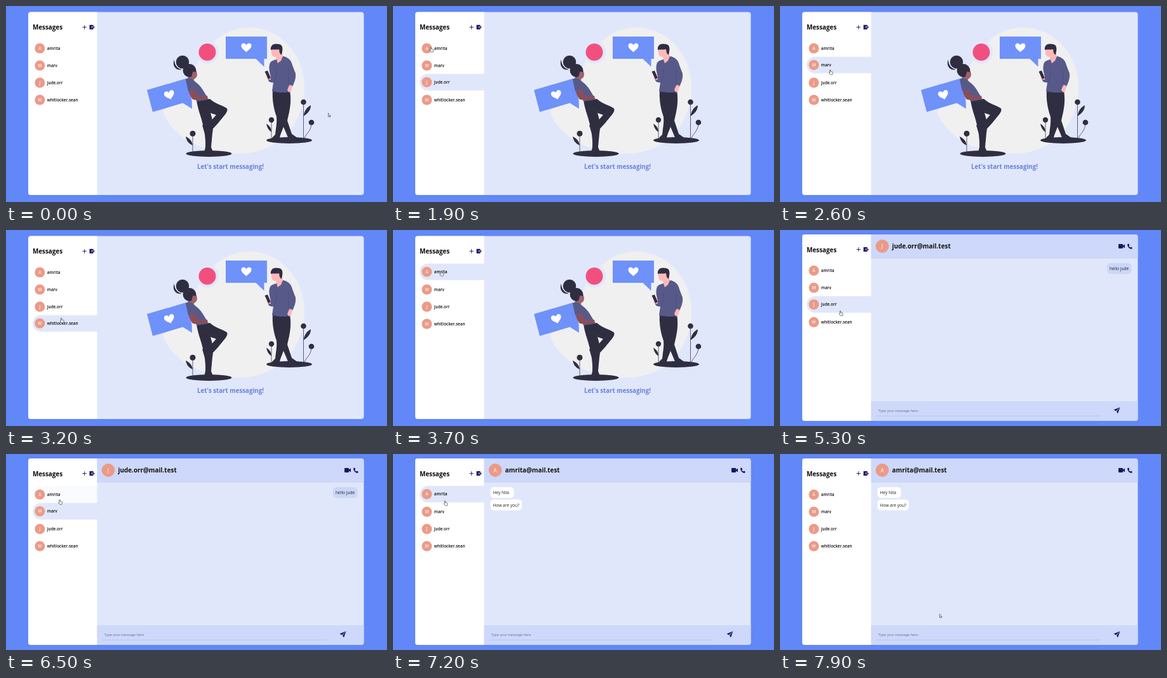
An HTML page for the animation above (8 s loop, 600 by 308 pixels).

```html
<!DOCTYPE html>
<html lang="en">
<head>
<meta charset="utf-8">
<title>Messages</title>
<style>
  html, body { margin: 0; width: 100%; height: 100%; overflow: hidden; background: #6187f9; }
  svg { display: block; width: 100%; height: 100%; font-family: "Open Sans", "Noto Sans", sans-serif; }
  .bold { font-weight: 700; }
  .dark { fill: #2f2e41; }
  .shirt { fill: #575a89; }
  .skin { fill: #ffb9b9; }
  .bubble { fill: #6f91fa; }
  .navy { fill: #1b1464; }
  .line { fill: none; stroke: #3f3d56; stroke-width: .8; }
  .crease { fill: none; stroke: #3f3d56; stroke-width: .7; opacity: .5; }
  .name { font-size: 6.4px; font-weight: 600; fill: #0b0b0b; }
  .initial { fill: #fff4f0; text-anchor: middle; }
  .msg { font-size: 6.6px; fill: #222; }
</style>
</head>
<body>
<svg viewBox="0 0 600 308">
  <defs>
    <path id="heart" fill="#fff" d="M0 7C-3 4-8 1-8-3C-8-7.500-2.500-8.500 0-4C2.500-8.500 8-7.500 8-3C8 1 3 4 0 7Z"/>
    <clipPath id="card"><rect id="cardBox" x="35" width="528.500" rx="4"/></clipPath>
  </defs>
  <rect width="600" height="308" fill="#6187f9"/>
  <g clip-path="url(#card)">
    <rect width="600" height="308" fill="#e1e7fb"/>
    <rect width="143.500" height="308" fill="#fff"/>

    <g id="home">
      <path fill="#f0f0f1" d="M383 34C430 34 470 75 470 127C470 190 425 232 368 232C306 232 259 203 247 165C262 152 278 128 302 90C320 58 345 34 383 34Z"/>
      <circle cx="317" cy="72.500" r="18" fill="#e1e7fb"/>
      <circle cx="317" cy="72.500" r="13.500" fill="#f1507e"/>
      <path class="bubble" d="M346 48H411V83H406.500V95.500L393.500 83H346Z"/>
      <use href="#heart" x="378.500" y="65.500"/>
      <path class="bubble" d="M222 132L283.500 114L292.500 148L293 161.500L278.500 152.500L231 166.500Z"/>
      <use href="#heart" transform="translate(257.500 140) rotate(-15)"/>

      <g class="dark">
        <ellipse cx="319.500" cy="232" rx="36" ry="5"/>
        <ellipse cx="446" cy="211" rx="36" ry="5"/>
        <circle cx="294" cy="200.500" r="4.500"/>
        <circle cx="418" cy="179" r="4.200"/>
        <circle cx="468.500" cy="151" r="4.300"/>
        <circle cx="481" cy="183" r="4.300"/>
        <path d="M294 219C287 216 284 211 283 205C289 208 293 212 294 219Z"/>
        <path d="M418 198C413 195 411 190 410 185C415 188 418 192 418 198Z"/>
        <path d="M468.500 173C470 164 474 159 480 156C480 164 475 169 468.500 173Z"/>
      </g>
      <path class="line" d="M294 200V231M418 179V208M468.500 151V208M481 183C481 196 474 199 470 207"/>

      <!-- woman -->
      <path class="dark" d="M265 84C261 93 267 102 277 100C269 98 265 92 265 84Z"/>
      <circle class="dark" cx="278" cy="88" r="10.300"/>
      <path fill="#a0616a" d="M289 103L299 101C302 105 301 112 297 114L293 121L286 115Z"/>
      <circle class="dark" cx="289" cy="101.500" r="10.400"/>
      <path fill="#a0616a" d="M294.500 103L300 104C302 109 300 114 296 114.500L291.500 113Z"/>
      <path class="dark" d="M300 148L321 146C330 154 343 157 348 161C351 166 341 175 335 183L324 195L318 194L313 201L309 187L318 189C320 183 327 176 331 171L322 168C326 180 327 190 325 200L323 222L328 234C322 237 312 237 311 234L314 222C315 206 311 188 306 172C303 163 301 155 300 148Z"/>
      <path class="shirt" d="M283 115C288 111 294 114 298 119C307 125 312 135 319 147L300 150C296 137 286 127 283 115Z"/>
      <path fill="#8b4d58" d="M287 126C287 133 289 140 293 146C297 149 308 147 318 146L317 141C309 142 302 140 298 137L296 126Z"/>
      <path class="shirt" d="M283 116C289 111 299 118 298 130L287 134Z"/>
      <path class="crease" d="M322 168L331 171M309 159C316 164 323 165 331 167"/>

      <!-- man -->
      <path class="dark" d="M420 132L447 133C450 150 447 163 443 180L450 201L460 208C460 214 450 214 446 211L437 190L432 203L430 211C426 214 417 212 419 207L424 202C425 192 427 183 426 174C421 160 419 146 420 132Z"/>
      <path class="skin" d="M418 69L433 66L434 75L439 82L426 90L425 80C419 81 417 75 418 69Z"/>
      <path class="dark" d="M417 69C416 61 422 58 430 60C437 61 436 69 434 77L431 74L430 68C425 69 421 68 417 69Z"/>
      <path class="shirt" d="M426 84L437 79C444 81 449 84 451 93L456 106C457 114 454 120 451 127L446 126L448 135C438 137 428 136 419 134L421 120C416 121 412 118 413 114L417 111C415 104 413 96 416 89C418 86 422 85 426 84Z"/>
      <path class="skin" d="M451 125L446 124L443 132L446 136L450 132ZM410 107L417 110L417 116L411 115Z"/>
      <path class="skin" d="M426 84L436 79L433 86L428 90Z"/>
      <path class="dark" d="M407.500 103L412 101.500L417 113L413 115Z"/>
      <path class="crease" d="M425 98C427 106 426 113 421 120M444 98C448 108 444 118 446 127M438 150L426 174M443 180L437 190"/>

      <text class="bold" x="353.500" y="256" font-size="9.700" fill="#6680df" text-anchor="middle">Let's start messaging!</text>
    </g>

    <g id="chat">
      <path fill="#cdd8fa" d="M143.500 7H564V43.500H143.500ZM143.500 269H564V300H143.500Z"/>
      <path d="M143.500 44H564" stroke="#aab7dc" stroke-width=".8" stroke-dasharray="1 .5"/>
      <path d="M151 292.300H504" stroke="#b3c0e4" stroke-width=".7"/>
      <circle cx="161" cy="25.500" r="10.400" fill="#ec9a88"/>
      <text id="peerInitial" class="initial" x="161" y="28.700" font-size="8.500"></text>
      <text id="peer" class="bold" x="176.500" y="29.200" font-size="9.900" fill="#111"></text>
      <path class="navy" d="M534 22H539Q540 22 540 23V24.500L543 22.500V28.500L540 26.500V28Q540 29 539 29H534Q533 29 533 28V23Q533 22 534 22Z"/>
      <path class="navy" d="M547 22.500L549 21.500L550.500 24L549.300 25Q550 27 551.700 27.500L552.800 26.500L555 28L554 29.800C550 30 547 26 547 22.500Z"/>
      <path class="navy" d="M535.500 278.500L525.500 282.500L529 284.500ZM535.500 278.500L530 285.300L532 288.500Z"/>
      <text x="154.500" y="286" font-size="5.700" fill="#727a91" font-family="Liberation Sans, Arial, sans-serif">Type your message here</text>
      <g id="sent">
        <rect x="515" y="52" width="38.500" height="17" rx="5.500" fill="#cbd7f9"/>
        <text class="msg" x="519" y="63">hello jude</text>
      </g>
      <g id="received">
        <rect x="153.500" y="52" width="37" height="17" rx="5.500" fill="#fff"/>
        <rect x="153.500" y="71.500" width="49.500" height="17" rx="5.500" fill="#fff"/>
        <text class="msg" x="157.500" y="63">Hey Nila</text>
        <text class="msg" x="157.500" y="82.500">How are you?</text>
      </g>
    </g>

    <g id="side">
      <text class="bold" x="42" y="37.300" font-size="9.830" fill="#0b0b0b">Messages</text>
      <path d="M120.300 33.300H127M123.600 30V36.600" stroke="#1b1464" stroke-width=".9"/>
      <path class="navy" d="M131.500 29.800H137.500V32.300H134.500V34.300H137.500V36.800H131.500ZM135 32.900H137.500V31.500L140 33.300L137.500 35.100V33.800H135Z"/>
    </g>
  </g>
  <g id="cursor" fill="#fff" stroke="#222" stroke-width=".6" stroke-linejoin="round">
    <path id="arrow" d="M0 0V5.500L1.300 4.400L2.200 6.300L3 5.900L2.200 4.100H3.800Z"/>
    <path id="hand" d="M-.6 4V.5Q0-.4 .7 .5V3L3.600 3.600Q4.300 4 4.100 5.200L3.500 7.700H.2L-1.900 5Q-1.700 4-.6 5Z"/>
  </g>
</svg>
<script>
const $ = id => document.getElementById(id);
const clamp = v => Math.max(0, Math.min(1, v));
const show = (id, on) => $(id).setAttribute('display', on ? 'inline' : 'none');

const people = ['amrita', 'marv', 'jude.orr', 'whitlocker.sean'];
const rows = people.map((name, i) => {
  const row = document.createElementNS('http://www.w3.org/2000/svg', 'g');
  row.innerHTML = `
    <path fill="#e1e7fb" d="M144-13H55A13 13 0 0 0 55 13H144Z"/>
    <circle cx="53.300" r="8" fill="#ec9a88"/>
    <text class="initial" x="53.300" y="2.300" font-size="6.300" font-weight="600">${name[0].toUpperCase()}</text>
    <text class="name" x="64.800" y="2.400">${name}</text>`;
  $('side').append(row);
  return row;
});

// Highlighted row: start, end, index
const hovers = [
  [1650, 1900, 2], [1900, 2300, 0], [2300, 2700, 1], [2700, 3050, 2],
  [3050, 3200, 3], [3200, 3350, 2], [3350, 3500, 1], [3500, 4000, 0],
  [4000, 4300, 1], [4300, 5550, 2], [6330, 6500, 1], [6480, 7200, 0]
];
// Pointer: time, x, y
const track = [
  [1200, 507.5, 168.5], [1700, 110, 120], [1900, 59.5, 64.5], [2100, 61, 64],
  [2600, 79, 100], [3100, 88, 144], [3700, 75.5, 64.5], [3900, 76, 65],
  [4700, 95, 126], [5500, 95, 127], [5900, 190, 280], [6100, 190, 280],
  [6400, 92, 86], [6500, 84.5, 71.5], [6800, 72, 63], [7100, 72, 63],
  [7800, 250, 250], [7900, 251.3, 251.5]
];
const OPEN = 4900, SENT = 5100, SWITCH = 7100;

function pointer(t) {
  const i = track.findIndex(k => k[0] > t);
  if (i < 1) return track[i ? track.length - 1 : 0].slice(1);
  const [t0, x0, y0] = track[i - 1], [t1, x1, y1] = track[i];
  const u = (t - t0) / (t1 - t0), e = u * u * (3 - 2 * u);
  return [x0 + (x1 - x0) * e, y0 + (y1 - y0) * e];
}

function draw(now) {
  const t = Math.floor(now / 100) * 100 % 8000;
  const open = t >= OPEN, second = t >= SWITCH;
  show('home', !open);
  show('chat', open);
  show('sent', t >= SENT && !second);
  show('received', second);
  $('cardBox').setAttribute('y', open ? 7 : 9.5);
  $('cardBox').setAttribute('height', open ? 293 : 287.5);
  $('side').setAttribute('transform', `translate(0 ${open ? -2.7 : 0})`);

  const peer = people[second ? 0 : 2];
  $('peer').textContent = peer + '@mail.test';
  $('peerInitial').textContent = peer[0].toUpperCase();

  rows.forEach((row, i) => {
    const glow = Math.max(...hovers.map(([a, b, r]) =>
      r === i ? Math.min(clamp((t - a) / 120), clamp(1 + (b - t) / 120)) : 0));
    row.firstElementChild.setAttribute('opacity', glow);
    row.setAttribute('transform', `translate(0 ${66.5 + 27 * i - .8 * glow})`);
  });

  const [x, y] = pointer(t), overList = x < 143 && y > 53 && y < 160;
  $('cursor').setAttribute('transform', `translate(${x} ${y})`);
  show('hand', overList);
  show('arrow', !overList);
  requestAnimationFrame(draw);
}
draw(0);
</script>
</body>
</html>
```
